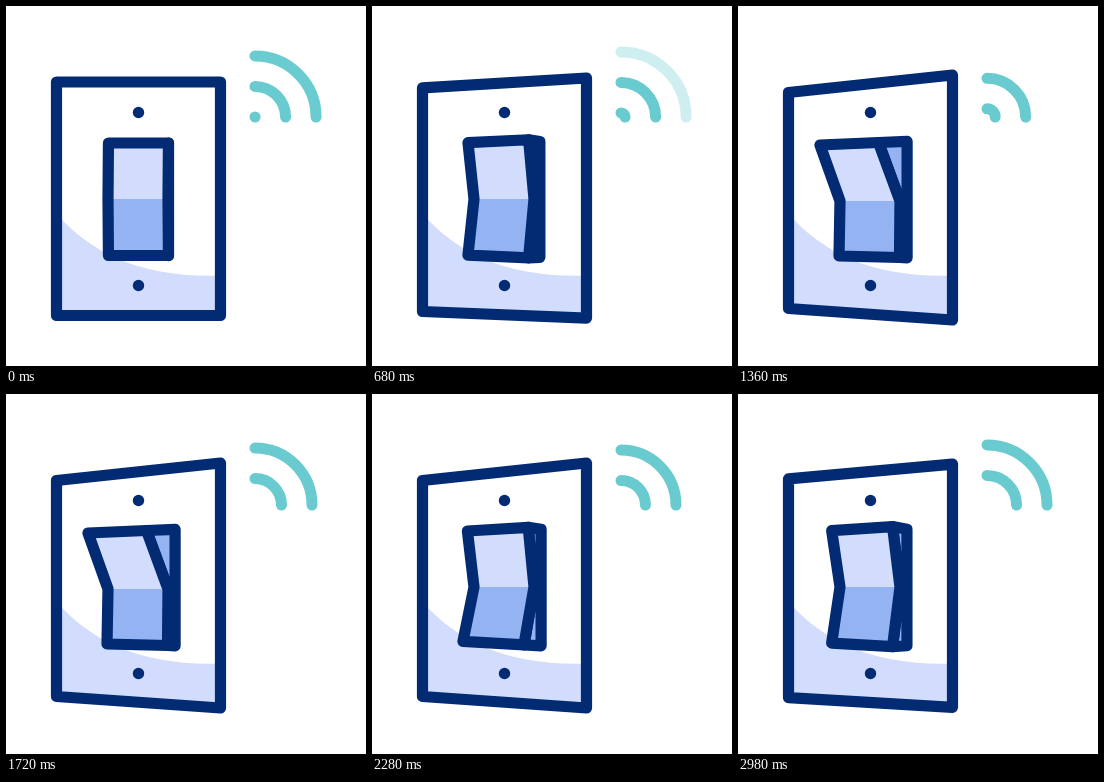
Write an HTML page that moves like this. It is 360 px wide and 360 px high and loops after 3 s.

```html
<!DOCTYPE html>
<html lang="en">
<head>
<meta charset="utf-8">
<title>Smart switch</title>
<style>
html, body { margin: 0; width: 100%; height: 100%; overflow: hidden; background: #fff; }
svg { display: block; width: 100vw; height: 100vh; }
.line { fill: none; stroke: #022b74; stroke-width: 11.2; stroke-linejoin: round; }
.screw { fill: #022b74; }
.light { fill: #d2dcfd; }
.blue { fill: #94b3f2; }
.wave { fill: none; stroke: #69cbd0; stroke-width: 11; stroke-linecap: round; }
</style>
</head>
<body>
<svg viewBox="0 0 360 360">
  <path id="shade" class="light"/>
  <path id="plate" class="line"/>
  <circle class="screw" cx="132.5" cy="106.5" r="5.7"/>
  <circle class="screw" cx="132.5" cy="279.5" r="5.7"/>
  <path id="side" class="line blue"/>
  <path id="face" class="light"/>
  <path id="lower" class="blue"/>
  <path id="rim" class="line"/>
  <path class="wave"/>
  <path class="wave"/>
  <path class="wave"/>
</svg>
<script>
const LOOP = 3000, TURN = 1200, PULSE = 600, GAP = 30.5;

// Rocker edges as [left x, left y, right x, right y]
const TOP = {
  flat: [102.5, 137, 162.5, 137],
  turned: [92.5, 136.5, 153.5, 132],
  up: [82, 139, 140.5, 136.5],
  down: [101, 138, 161.5, 136]
};
const BOTTOM = {
  flat: [102.5, 249.5, 162.5, 249.5],
  turned: [92.5, 249, 153.5, 253],
  up: [101, 250, 161.5, 251.5],
  down: [88, 244.5, 149, 247]
};

const byId = id => document.getElementById(id);
const waves = document.querySelectorAll('.wave');
const ramp = (t, from, to) => Math.min(1, Math.max(0, (t - from) / (to - from)));
const mix = (a, b, k) => a + (b - a) * k;
const mixAll = (a, b, k) => a.map((v, i) => mix(v, b[i], k));
const setPath = (id, d) => byId(id).setAttribute('d', d);
const polygon = (...points) => 'M' + points.join('L') + 'Z';

function drawPlate(tilt) {
  const left = mix(309.5, 302.5, tilt), right = mix(309.5, 314, tilt);
  setPath('plate', polygon([50.5, mix(76, 86.5, tilt)], [214.5, mix(76, 69, tilt)], [214.5, right], [50.5, left]));
  setPath('shade', `M50.5 208C87 249 138 272 214.5 269.5V${right}L50.5 ${left}Z`);
}

function edge(poses, tilt, press) {
  const rest = mixAll(poses.flat, poses.turned, tilt ** 0.75);
  const [x1, y1, x2, y2] = mixAll(rest, press > 0 ? poses.up : poses.down, Math.abs(press));
  return [[x1, y1], [x2, y2]];
}

function drawRocker(tilt, press) {
  const [topL, topR] = edge(TOP, tilt, press);
  const [botL, botR] = edge(BOTTOM, tilt, press);
  const hinge = 193 + 2 * Math.max(0, press);
  const midL = [102, hinge], midR = [162, hinge];
  const depth = 1 - (1 - tilt) ** 2;
  const backX = 162.5 + 6.6 * depth;
  const face = polygon(topL, topR, midR, botR, botL, midL);
  setPath('side', polygon(topR, [backX, 137 - 1.7 * depth], [backX, 249.5 + 2.3 * depth], botR, midR));
  setPath('face', face);
  setPath('rim', face);
  setPath('lower', polygon(midL, midR, botR, botL));
}

// Each arc grows into the place of the next; the last one fades out
function drawWaves(phase) {
  waves.forEach((wave, i) => {
    const r = Math.max(0.1, GAP * (i + phase));
    wave.setAttribute('d', `M249 ${111 - r}A${r} ${r} 0 0 1 ${249 + r} 111`);
    wave.style.opacity = i === 2 ? 1 - ramp(phase, 0, 0.2) : 1;
  });
}

function draw(now) {
  const t = now % LOOP;
  const tilt = ramp(t, 0, TURN) - ramp(t, 2800, 2800 + TURN);
  const press = ramp(t, TURN, 1340) - 2 * ramp(t, 2120, 2360) + ramp(t, 2640, 2800);
  drawPlate(tilt);
  drawRocker(tilt, press);
  drawWaves(t % PULSE / PULSE);
}

function tick(now) {
  draw(now);
  requestAnimationFrame(tick);
}
draw(0);
requestAnimationFrame(tick);
</script>
</body>
</html>
```
